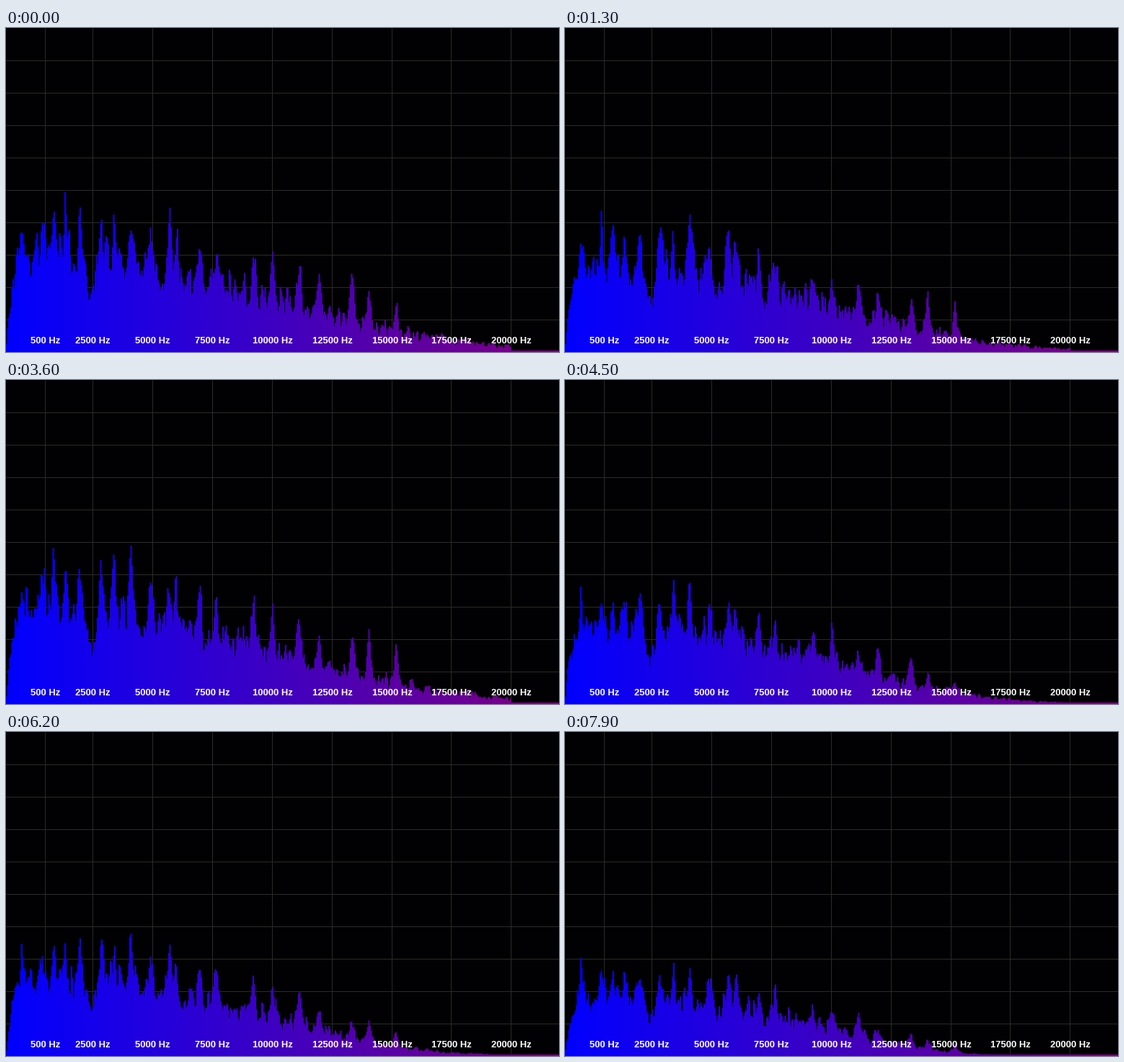
These frames come from a looping animation (767 by 450 pixels, 8 s). A matplotlib script:

```python
import numpy as np
import matplotlib.pyplot as plt
from matplotlib.animation import FuncAnimation
from matplotlib.collections import LineCollection, PolyCollection

W, H, DPI = 767, 450, 100
FRAMES, STEP = 80, 100
BINS, PITCH, BAR = 512, 1.5, 2

# Loudness of the music over time: seconds, level
LOUD_T = [0, 1.3, 2.3, 3.6, 5.5, 6.9, 7.9]
LOUD = [1, .75, .2, 1, 0, .95, .05]
BEAT, FIRST_BEAT = 1.15, 0.5

# Where tones stand out of the floor (px)
TONES = np.array([22, 50, 66, 82, 103, 132, 150, 173, 201, 227, 236,
                  269, 291, 343, 370, 407, 434, 480, 503, 541])
MARKS = [500, *range(2500, 20001, 2500)]

left = np.arange(BINS) * PITCH
mid = left + PITCH / 2


def bell(center, width):
    return np.exp(-((mid - center) / width) ** 2)


def mark_x(hz):
    return round(37.3 + hz * 0.03315)


def floor_level(loud):
    """Smooth spectrum: quick rise, plateau, then a roll-off."""
    rise = 1 - np.exp(-mid / 8)
    fall = np.exp(-(mid / (400 + 60 * loud)) ** (3.5 - loud))
    dips = 1 - 0.4 * bell(118, 6) - 0.15 * bell(210, 5) - 0.2 * bell(275, 7)
    return (75 + 53 * loud) * rise * fall * dips


def flicker(rng):
    """Per-bin noise that drifts from frame to frame."""
    lead = 12
    raw = rng.normal(size=(FRAMES + lead, BINS))
    raw = 0.8 * raw + 0.6 * np.roll(raw, 1, axis=1)
    out = np.zeros_like(raw)
    for i in range(1, len(raw)):
        out[i] = 0.75 * out[i - 1] + 0.66 * raw[i]
    return np.clip(out[lead:], -1.7, 2.2)


def build_levels():
    rng = np.random.default_rng(11)
    noise = flicker(rng)
    rough = 0.12 + 0.13 * (mid / W) ** 2
    strength = 0.5 + 1.1 * (TONES / 541) ** 3
    rate = rng.uniform(0.3, 0.9, len(TONES))
    phase = rng.uniform(0, 2 * np.pi, len(TONES))
    shape = np.exp(-(np.abs(mid - TONES[:, None]) / 3.6) ** 1.5)

    levels = np.empty((FRAMES, BINS))
    for i in range(FRAMES):
        t = i * STEP / 1000
        swing = 1 + 0.25 * np.sin(2 * np.pi * rate * t + phase)
        tones = ((strength * swing)[:, None] * shape).max(axis=0)
        since = (t - FIRST_BEAT) % BEAT
        gain = 1 + 0.25 * np.exp(-since / 0.2)
        base = floor_level(np.interp(t, LOUD_T, LOUD)) * (1 + tones)
        levels[i] = base * gain * (1 + rough * noise[i] / (1 + tones))
    levels[:, mid > 700] = 0
    return np.clip(levels, 2, 290)


LEVELS = build_levels()

fig = plt.figure(figsize=(W / DPI, H / DPI), dpi=DPI, facecolor="#010103")
ax = fig.add_axes([0, 0, 1, 1])
ax.set_xlim(0, W)
ax.set_ylim(H, 0)
ax.axis("off")

grid = [[(mark_x(hz), 0), (mark_x(hz), H)] for hz in MARKS]
grid += [[(0, y), (W, y)] for y in range(45, H, 45)]
ax.add_collection(LineCollection(grid, colors="#2a2a2a",
                                 linewidths=72 / DPI, zorder=1))

mix = (mid / W)[:, None]
colors = (1 - mix) * np.array([0, 0, 1]) + mix * np.array([.5, 0, .5])
verts = np.empty((BINS, 4, 2))
verts[:, :2, 0] = left[:, None]
verts[:, 2:, 0] = left[:, None] + BAR
verts[:, :, 1] = H
bars = PolyCollection(verts, facecolors=colors, edgecolors="none",
                      linewidths=0, zorder=2)
bars.set_snap(False)
ax.add_collection(bars, autolim=False)

for hz in MARKS:
    ax.text(mark_x(hz) + .5, 437.5, f"{hz} Hz", color="white", ha="center",
            va="baseline", family="Liberation Sans", weight="bold",
            size=13 * 72 / DPI, zorder=3)


def draw(i):
    verts[:, 1:3, 1] = (H - LEVELS[i])[:, None]
    bars.set_verts(verts)
    return [bars]


anim = FuncAnimation(fig, draw, frames=FRAMES, interval=STEP,
                     repeat=True, repeat_delay=0)
plt.show()
```
